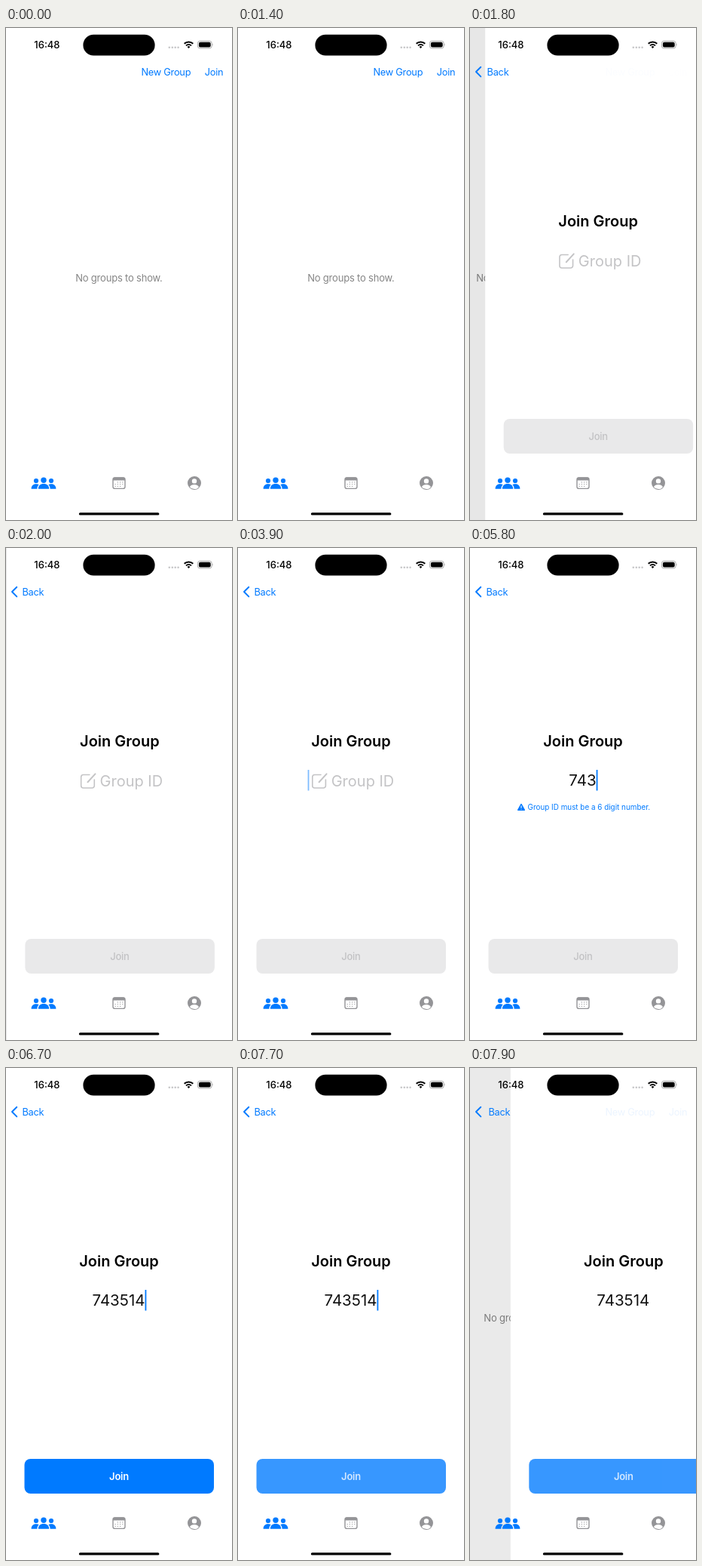
Animation, 300 px wide and 652 px high, one loop 8000 ms. Source, as an HTML page:

```html
<!DOCTYPE html>
<html lang="en">
<head>
<meta charset="utf-8">
<style>
  html, body { margin: 0; width: 100%; height: 100%; overflow: hidden; background: #fff; }
  svg { display: block; width: 300px; height: 652px; font: 13px Inter, sans-serif; }
  .nav { font-size: 12.8px; letter-spacing: -.02em; fill: #007aff; }
  .mid { text-anchor: middle; }
  .big { font-size: 20px; }
  .line { fill: none; stroke-linecap: round; stroke-linejoin: round; }
</style>
</head>
<body>
<svg viewBox="0 0 300 652">
  <g id="listPage">
    <text class="mid" x="149.9" y="336.4" letter-spacing="-.015em" fill="#858585">No groups to show.</text>
  </g>
  <rect id="dim" width="300" height="652"/>

  <g id="joinPage">
    <rect width="310" height="652" fill="#fff"/>
    <text class="mid big" x="150" y="263.4" font-weight="600">Join Group</text>
    <g id="placeholder" fill="#c4c4c6">
      <g class="line" stroke="#c4c4c6">
        <path stroke-width="1.6" d="M110 300.5H101.8a3 3 0 0 0-3 3V315a3 3 0 0 0 3 3H113.4a3 3 0 0 0 3-3V307"/>
        <path stroke-width="2" d="M107.6 310.2L117.6 299.4"/>
      </g>
      <text class="big" x="123.7" y="316.3">Group ID</text>
    </g>
    <text id="digits" class="mid big" style="font-size:20.5px" x="149.5" y="315.4" fill="#111"></text>
    <rect id="caret" y="294" width="1.8" height="27.5" fill="#007aff"/>
    <g id="warning" fill="#007aff">
      <path class="line" style="fill:#007aff" stroke="#007aff" stroke-width="1.6" d="M68 339.6L72.2 347.2H63.8Z"/>
      <path class="line" stroke="#fff" stroke-width="1.1" d="M68 341.8v2.4M68 346.2v.1"/>
      <text x="76.6" y="347" font-size="9.9">Group ID must be a 6 digit number.</text>
    </g>
    <g id="button">
      <rect id="buttonFill" x="24.5" y="518" width="251.5" height="46" rx="8"/>
      <text id="buttonText" class="mid" x="150" y="545.8" letter-spacing="-.02em">Join</text>
    </g>
  </g>

  <g class="nav">
    <g id="listNav">
      <text x="179.4" y="62.7">New Group</text>
      <text id="joinLink" x="263.8" y="62.7">Join</text>
    </g>
    <g id="backNav">
      <path class="line" stroke="#007aff" stroke-width="1.9" d="M14.3 51.8L8 58L14.3 64.4"/>
      <text id="backText" y="62.7">Back</text>
    </g>
  </g>

  <text x="37.3" y="27.1" font-weight="500">16:48</text>
  <rect x="102.4" y="8.8" width="95.2" height="27.8" rx="13.9"/>
  <path class="line" stroke="#c6c6c8" stroke-width="2.6" d="M216.8 25.8h0M220.8 25.8h0M224.7 25.8h0M228.6 25.8h0"/>
  <path class="line" style="stroke-linecap:butt" stroke="#000" stroke-width="2" d="M236.7 20.8a8.2 8.2 0 0 1 11.6 0M239 23.4a5 5 0 0 1 7 0"/>
  <path d="M240.6 24.9a2.7 2.7 0 0 1 3.8 0L242.5 26.9Z"/>
  <rect x="254.4" y="17.3" width="18.8" height="9.6" rx="3" fill="none" stroke="#a0a0a0" stroke-width=".9"/>
  <rect x="255.9" y="18.8" width="15.8" height="6.6" rx="1.9"/>
  <path d="M274.2 20.6q1.3 1.5 0 3z" fill="#a0a0a0"/>

  <g fill="#007aff">
    <circle cx="50" cy="599.2" r="3.7"/>
    <path d="M42.8 610.7c0-4.3 2.8-6.8 7.2-6.8s7.2 2.5 7.2 6.8z"/>
    <g id="friend">
      <circle cx="40" cy="600" r="3.1"/>
      <path d="M33.6 610.7c0-4 2.6-6.5 6.2-6.5 1.6 0 2.8.3 3.8 1-1.6 1.5-2.2 3.5-2.2 5.5z"/>
    </g>
    <use href="#friend" transform="matrix(-1 0 0 1 100 0)"/>
  </g>
  <g fill="#949497">
    <rect x="142" y="596" width="16" height="14.4" rx="2.4" fill="none" stroke="#949497" stroke-width="1.4"/>
    <path d="M142 599.6v-2.1q0-2 2-2h12q2 0 2 2v2.1z"/>
    <path class="line" stroke="#949497" stroke-width="1.3" d="M148.4 601.9h0M151.6 601.9h0M154.8 601.9h0M145.2 604.6h0M148.4 604.6h0M151.6 604.6h0M154.8 604.6h0M145.2 607.3h0M148.4 607.3h0M151.6 607.3h0"/>
    <circle cx="250" cy="603" r="9"/>
    <circle cx="250" cy="600.4" r="3.2" fill="#fff"/>
    <path d="M243.9 608.3c1.2-2 3.4-3.2 6.1-3.2s4.9 1.2 6.1 3.2a8 8 0 0 1-12.2 0z" fill="#fff"/>
  </g>
  <rect x="96.8" y="642.2" width="106.6" height="3.4" rx="1.7"/>
</svg>

<script>
const LOOP = 8000, STEP = 100;
const PUSH = 1560, POP = 7858, PRESS = 7700;
const CODE = "743514", KEY_TIMES = [4200, 4500, 4800, 6300, 6600, 6700];
// caret opacity as [time, alpha] pairs, linear in between
const CARET = [[2900, 0], [3300, 1], [3500, 1], [3700, 0], [3800, 0], [4000, 1],
  [5200, 1], [5500, 0], [5600, 0], [5800, 1], [7000, 1], [7300, 0],
  [7400, 0], [7600, 1], [PRESS, 1], [PRESS + 100, 0]];

const $ = id => document.getElementById(id);
const set = (id, attrs) => { for (const k in attrs) $(id).setAttribute(k, attrs[k]); };
const clamp = v => Math.max(0, Math.min(1, v));

// critically damped spring, 0 to 1
function spring(ms) {
  const x = 0.01826 * Math.max(0, ms);
  return 1 - (1 + x) * Math.exp(-x);
}

function track(points, t) {
  let [t0, v0] = points[0];
  for (const [t1, v1] of points) {
    if (t < t1) return t1 === t0 ? v0 : v0 + (v1 - v0) * clamp((t - t0) / (t1 - t0));
    [t0, v0] = [t1, v1];
  }
  return v0;
}

function draw(t) {
  const open = spring(t - PUSH) - spring(t - POP);
  set("listPage", { transform: `translate(${-90 * open})` });
  set("dim", { opacity: 0.1 * open });
  set("joinPage", { transform: `translate(${300 * (1 - open)})` });
  set("listNav", { opacity: (1 - open) ** 1.5 });
  set("joinLink", { opacity: t >= 1500 && t < POP ? 0.4 : 1 });
  set("backNav", { opacity: clamp(open * 1.2) });
  set("backText", { x: 21.4 + 17 * (1 - open) });

  const count = KEY_TIMES.filter(k => t >= k).length;
  const ready = count === CODE.length;
  const pressed = t >= PRESS;
  $("digits").textContent = CODE.slice(0, count);
  set("placeholder", { opacity: count ? 0 : 1 });
  set("caret", {
    x: count ? 149.5 + $("digits").getComputedTextLength() / 2 : 92.6,
    opacity: track(CARET, t)
  });
  set("warning", { opacity: ready ? 0 : clamp((t - 4100) / 400) });
  set("button", { opacity: pressed ? 0.78 : 1 });
  set("buttonFill", { fill: ready ? "#007aff" : "#e9e9ea" });
  set("buttonText", {
    fill: ready ? "#fff" : "#c2c2c4",
    opacity: pressed ? 0.78 : 1,
    "font-weight": ready ? 600 : 500
  });
}

function tick() {
  draw(Math.floor(performance.now() % LOOP / STEP) * STEP);
  requestAnimationFrame(tick);
}
tick();
</script>
</body>
</html>
```
